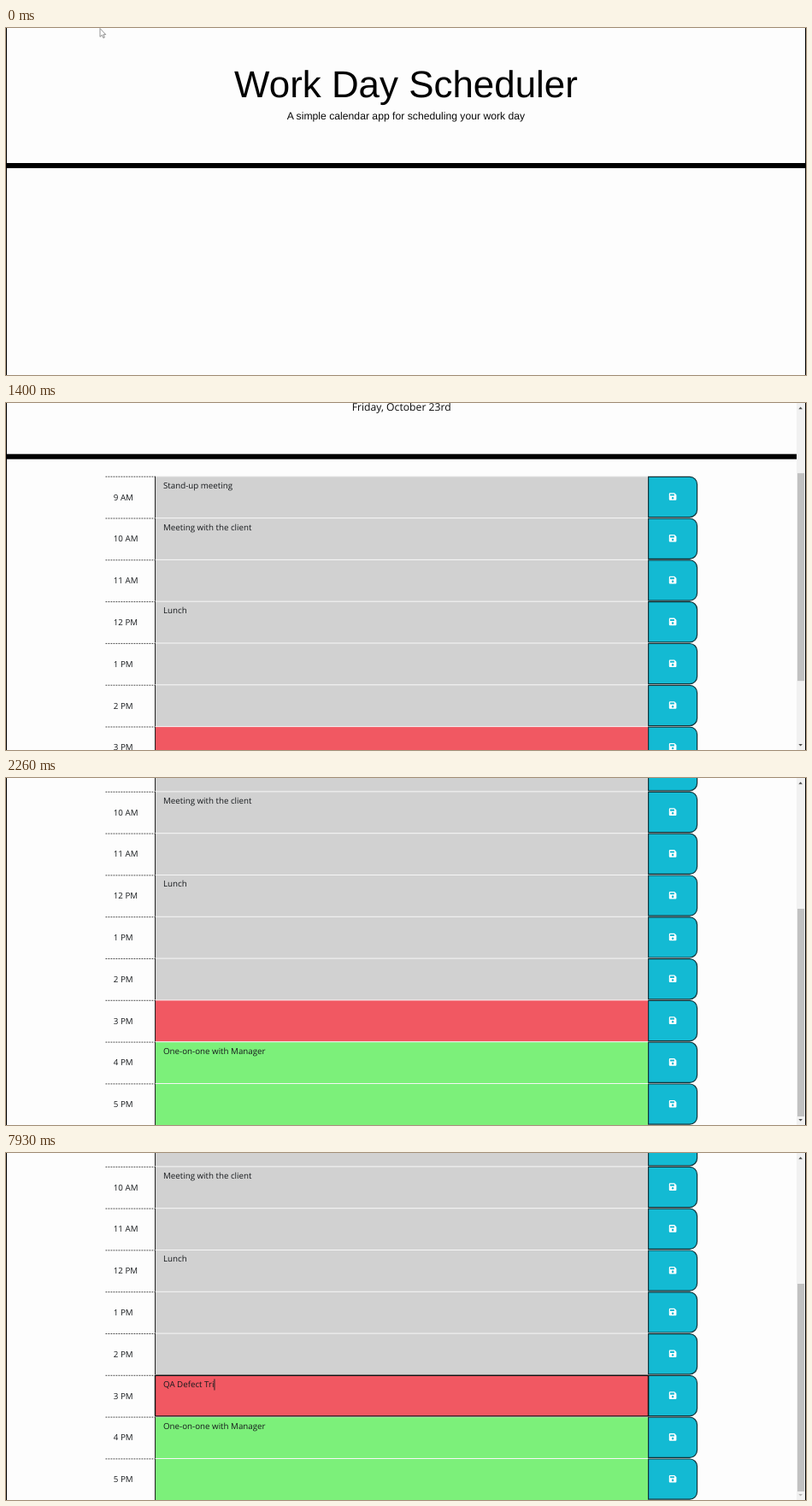
Write an HTML page that moves like this. It is 936 by 406 pixels and loops after 8 s.

```html
<!DOCTYPE html>
<html lang="en">
<head>
<meta charset="utf-8">
<title>Work Day Scheduler</title>
<style>
  html, body { margin: 0; width: 100%; height: 100%; overflow: hidden; background: #fdfdfd; }
  svg { display: block; width: 936px; height: 406px; }
  text { font: 9.76px "Open Sans", sans-serif; fill: #16191c; white-space: pre; text-rendering: geometricPrecision; }
  .center { text-anchor: middle; }
  .lead { font-size: 12.2px; fill: #0a0a0a; }
  .title { font-size: 43.92px; fill: #000; }
  #plain text { font-family: "Liberation Sans", Arial, sans-serif; }
</style>
</head>
<body>
<svg viewBox="0 0 936 406">
  <g id="plain">
    <text class="center title" x="468" y="81">Work Day Scheduler</text>
    <text class="center lead" x="468" y="107">A simple calendar app for scheduling your work day</text>
    <rect y="158" width="936" height="6"/>
  </g>
  <g id="full">
    <g id="page">
      <text class="center title" x="462.7" y="82">Work Day Scheduler</text>
      <text class="center lead" x="462.7" y="106">A simple calendar app for scheduling your work day</text>
      <text class="center lead" x="462.7" y="128">Friday, October 23rd</text>
      <rect y="179" width="925" height="6"/>
      <g id="rows"></g>
      <g id="focus">
        <rect x="174.5" y="498.3" width="577" height="47.6" rx="1" fill="none" stroke="#111" stroke-width="1.4"/>
        <text id="entry" x="184" y="512"></text>
        <rect id="caret" y="502.5" width="1" height="13" fill="#222"/>
      </g>
    </g>
    <rect x="925" width="10" height="406" fill="#f1f1f1"/>
    <rect id="thumb" x="926" width="8" height="243" fill="#c1c1c1"/>
    <path id="up" d="M927.3 7.2h4.6l-2.3-2.6z"/>
    <path id="down" d="M927.3 399h4.6l-2.3 2.6z"/>
  </g>
  <path id="cursor" d="M0 0V9.8L2.3 7.7 3.9 11.2 5.4 10.5 3.9 7.2H6.8Z" fill="#fff" stroke="#777" stroke-width=".8"/>
  <path d="M.5 0V406M935.5 0V406" stroke="#000"/>
</svg>
<script>
const $ = id => document.getElementById(id);
const LOOP = 8000, FPS = 15, TOP = 205, PITCH = 48.8, MAX_SCROLL = 238;
const GREY = '#d1d1d1', RED = '#f15862', GREEN = '#7cf07a';

const plans = [
  ['9 AM', 'Stand-up meeting', GREY], ['10 AM', 'Meeting with the client', GREY],
  ['11 AM', '', GREY], ['12 PM', 'Lunch', GREY], ['1 PM', '', GREY], ['2 PM', '', GREY],
  ['3 PM', '', RED], ['4 PM', 'One-on-one with Manager', GREEN], ['5 PM', '', GREEN]
];

$('rows').innerHTML = plans.map(([hour, note, fill], i) => `
  <g transform="translate(0 ${TOP + i * PITCH})">
    <path d="M116.5 .5H174" stroke="#333" stroke-width=".9" stroke-dasharray="1.8 1.2"/>
    <text x="125.8" y="27.8">${hour}</text>
    <rect x="174" width="577.5" height="${PITCH}" fill="${fill}"/>
    <path d="M174 .1H751.5" stroke="#f6f6f6"/>
    <path d="M174.5 0V${PITCH}" stroke="#222"/>
    <text x="184" y="14">${note}</text>
    <path d="M751.6 .6H800a8.6 8.6 0 0 1 8.6 8.6V39.2a8.6 8.6 0 0 1-8.6 8.6H751.6Z" fill="#13bad3" stroke="#12343a" stroke-width="1.2"/>
    <path class="icon" transform="translate(775.8 19.5)" fill="#fff" fill-rule="evenodd"
      d="M1 0H6.3L8.6 2.3V7.6a1 1 0 0 1-1 1H1a1 1 0 0 1-1-1V1a1 1 0 0 1 1-1ZM1.2 1.3V3.4H6.1V1.3ZM3 6a1.3 1.3 0 1 0 2.6 0a1.3 1.3 0 1 0-2.6 0Z"/>
  </g>`).join('');
const icons = document.querySelectorAll('.icon');

// [time, text so far]; the caret blinks from the latest key press
const keys = [[3330, ''], [5000, 'Q'], [5060, 'QA'], [5460, 'QA '], [5860, 'QA D'], [6000, 'QA De'],
  [6260, 'QA Def'], [6330, 'QA Defe'], [6460, 'QA Defect'], [6660, 'QA Defect '],
  [7460, 'QA Defect T'], [7660, 'QA Defect Tr'], [7930, 'QA Defect Tri']];
const scrollStops = [[933, 0], [1000, 3], [1200, 39], [1333, 94], [1533, 169.5], [1667, 183]];

const clamp = u => Math.max(0, Math.min(1, u));
const smooth = u => u * u * (3 - 2 * u);

function scrollAt(t) {
  let y = 0;
  for (let i = 1; i < scrollStops.length; i++) {
    const [t0, y0] = scrollStops[i - 1], [t1, y1] = scrollStops[i];
    y += (y1 - y0) * clamp((t - t0) / (t1 - t0));
  }
  return y + (MAX_SCROLL - 183) * smooth(clamp((t - 1867) / 400));
}

function show(el, on) { el.style.display = on ? '' : 'none'; }

function draw(now) {
  const t = Math.floor((now % LOOP + 7) * FPS / 1000) * 1000 / FPS;
  const loaded = t >= 60;
  show($('plain'), !loaded);
  show($('full'), loaded);
  icons.forEach(icon => show(icon, t >= 130));

  const y = scrollAt(t);
  $('page').setAttribute('transform', `translate(0 ${-y})`);
  $('thumb').setAttribute('y', 11 + y * 142 / MAX_SCROLL);
  $('up').setAttribute('fill', y > 0 ? '#505050' : '#b5b5b5');
  $('down').setAttribute('fill', y < MAX_SCROLL ? '#505050' : '#b5b5b5');

  const key = keys.findLast(k => t >= k[0]);
  show($('focus'), key);
  if (key) {
    $('entry').textContent = key[1];
    $('caret').setAttribute('x', 184 + (key[1] ? $('entry').getComputedTextLength() : 0));
    show($('caret'), Math.floor((t - key[0]) / 530) % 2 === 0);
  }

  const u = smooth(clamp((t - 333) / 467));
  const cx = 110 + 310 * u, cy = .5 + 260 * u;
  $('cursor').setAttribute('transform', `translate(${cx} ${cy})`);
  show($('cursor'), t < 800 && !(cx > 174 && cy > TOP));
}

function tick(now) {
  draw(now);
  requestAnimationFrame(tick);
}
draw(0);
requestAnimationFrame(tick);
</script>
</body>
</html>
```
